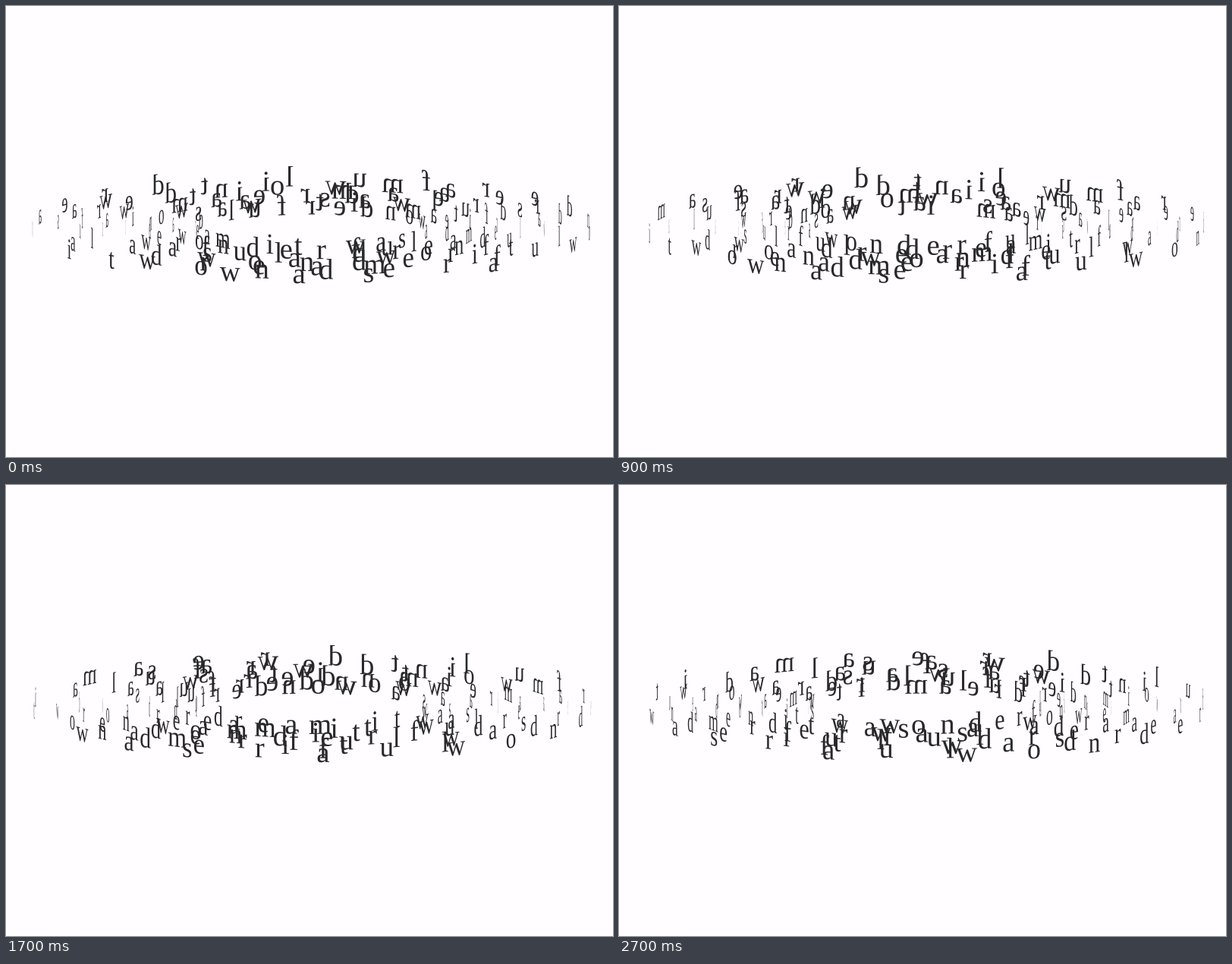
An HTML page with a canvas that plays this animation: 800 by 594 pixels, repeating every 2800 ms.

```html
<!DOCTYPE html>
<html lang="en">
<head>
<meta charset="utf-8">
<title>Rotating text rings</title>
<style>
  html, body { margin: 0; height: 100%; overflow: hidden; background: #fffdff; }
  canvas { display: block; }
</style>
</head>
<body>
<canvas id="stage" width="800" height="594"></canvas>
<script>
const ctx = document.getElementById('stage').getContext('2d');
const TEXT = 'it was a wonderful dream ';
const RAD = Math.PI / 180;
const LOOP = 2800, STEP = 100;      // ms
const START = 34.037;               // seconds the rings have already turned
const CENTER = { x: 403, y: 301.2 };
const OUTER = 368, GAP = 30.67, RINGS = 8;
const TILT_SIN = Math.sin(10 * RAD), TILT_COS = Math.cos(10 * RAD);

function drawLetter(char, angle, radius) {
  const sin = Math.sin(angle), cos = Math.cos(angle);
  // A glyph standing on the ring, seen through the tilt; it mirrors at the back.
  ctx.setTransform(cos, -sin * TILT_SIN, 0, TILT_COS,
    CENTER.x + radius * sin, CENTER.y + radius * cos * TILT_SIN);
  ctx.fillText(char, 0, 0);
}

function draw(seconds) {
  ctx.setTransform(1, 0, 0, 1, 0, 0);
  ctx.fillStyle = '#fffdff';
  ctx.fillRect(0, 0, 800, 594);
  ctx.fillStyle = '#29282c';
  ctx.font = '39px "Liberation Serif", "Times New Roman", serif';
  ctx.textAlign = 'center';
  const slot = 360 / TEXT.length;
  for (let ring = 0; ring < RINGS; ring++) {
    const period = 16 - 2 * ring;   // seconds per turn, faster towards the middle
    const turn = 360 * seconds / period;
    [...TEXT].forEach((char, i) => {
      if (char !== ' ') drawLetter(char, (slot * (i - 1) - turn) * RAD, OUTER - GAP * ring);
    });
  }
}

function tick() {
  // Lead by one display refresh so each step is on screen when it is due.
  const step = Math.floor((performance.now() + 16) % LOOP / STEP);
  draw(START + step * STEP / 1000);
  requestAnimationFrame(tick);
}
tick();
</script>
</body>
</html>
```
